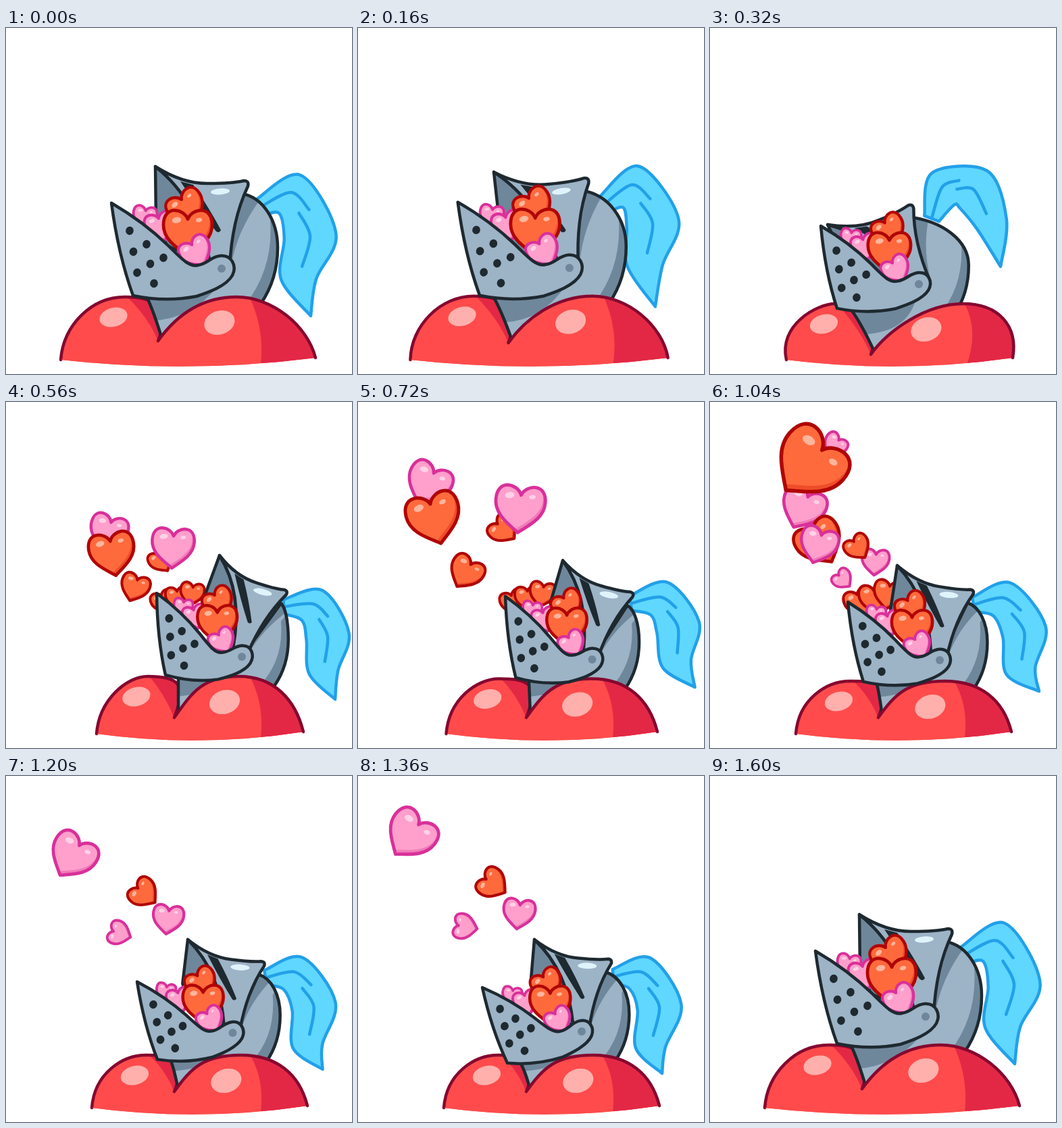
Recreate the animation shown at these times as an HTML page with a canvas. Size 512 by 512 pixels, loop 1.68 s.

```html
<!DOCTYPE html>
<html lang="en">
<head>
<meta charset="utf-8">
<title>Knight with hearts</title>
<style>
html, body { margin: 0; width: 100%; height: 100%; overflow: hidden; background: #fff; }
canvas { display: block; width: 100vw; height: 100vh; }
</style>
</head>
<body>
<canvas id="stage" width="512" height="512"></canvas>
<script>
const ctx = document.getElementById('stage').getContext('2d');
const LOOP = 1680, STEP = 80;
const INK = '#1e2930', STEEL = '#9db3c6', SHADE = '#6f879b';
const RED = { fill: '#ff6a3c', shade: '#ee4d2a', line: '#b00505', shine: '#ffb59c' };
const PINK = { fill: '#ff9fcc', shade: '#f07cb8', line: '#d9309a', shine: '#ffd2e8' };

// body: left, right, top, cleft x, cleft y, squash; jaw: tip, bottom, hinge;
// visor: tip, corner; plume: points of its middle line
const broad = [127, 446, 413, 249, 467, 0];
const rest = {
  body: [81, 458, 398, 225, 463, 0],
  jaw: [156, 259, 188, 395, 319, 356], visor: [221, 205, 358, 228],
  plume: [375, 266, 420, 246, 450, 308, 433, 372, 451, 426]
};
const shut = {
  body: [113, 448, 408, 238, 483, 1],
  jaw: [164, 293, 188, 414, 309, 379], visor: [174, 291, 299, 262],
  plume: [328, 282, 345, 238, 390, 239, 417, 290, 430, 353]
};
const burst = {
  body: [134, 440, 406, 249, 467, 0],
  jaw: [223, 283, 236, 403, 349, 377], visor: [316, 227, 416, 281],
  plume: [411, 303, 453, 301, 476, 347, 470, 400, 487, 440]
};
const spray = {
  body: broad,
  jaw: [213, 292, 231, 411, 344, 385], visor: [290, 242, 399, 287],
  plume: [396, 293, 438, 281, 471, 320, 474, 375, 510, 404]
};
const lean = {
  body: broad,
  jaw: [204, 296, 227, 413, 340, 382], visor: [277, 242, 390, 280],
  plume: [390, 300, 432, 292, 465, 340, 460, 398, 487, 428]
};
const settle = {
  body: broad,
  jaw: [184, 313, 221, 424, 331, 378], visor: [261, 242, 375, 273],
  plume: [378, 297, 417, 292, 446, 342, 433, 402, 450, 440]
};

const mix = (a, b, k) => a + (b - a) * k;
const mixPose = (a, b, k) => Object.fromEntries(
  Object.keys(a).map(part => [part, a[part].map((v, i) => mix(v, b[part][i], k))]));
const ease = k => k * k * (3 - 2 * k);
const easeOut = k => 1 - (1 - k) ** 2;

const timeline = [
  [0, rest], [100, mixPose(rest, lean, -.25)], [320, shut], [560, burst],
  [880, spray], [1040, lean], [1360, settle], [1600, rest], [LOOP, rest]
];

// Hearts of one volley land together: colour, x, y, width, angle
const MOUTH = { x: 265, y: 312 };
const volleys = [
  { launch: 400, gap: 0, land: 880, hearts: [
    [PINK, 88, 98, 74, 30], [RED, 98, 155, 88, -17], [RED, 211, 173, 50, -55],
    [PINK, 237, 139, 82, 6], [RED, 149, 245, 58, 36]] },
  { launch: 820, gap: 0, land: 1040, hearts: [
    [PINK, 184, 64, 40, 40], [PINK, 137, 157, 70, 25],
    [RED, 163, 208, 74, -31], [RED, 146, 93, 110, 42]] },
  { launch: 780, gap: 50, land: 1360, hearts: [
    [PINK, 238, 204, 52, 8], [RED, 200, 160, 50, -55],
    [PINK, 159, 223, 42, -80], [PINK, 77, 88, 78, 38]] }
];

// Hearts lying in the open jaw, in the rest pose
const load = [
  [PINK, 205, 280, 40, 10], [PINK, 229, 294, 50, -15], [RED, 268, 267, 60, -32],
  [RED, 269, 303, 77, 0], [PINK, 282, 332, 52, -32]
];

const heartPath = new Path2D('M0-.28C-.08-.5-.5-.58-.5-.16C-.5.15-.2.32 0 .48' +
  'C.2.32 .5.15 .5-.16C.5-.58 .08-.5 0-.28Z');
const jawPath = new Path2D('M156 259Q204 287 240 322C262 344 272 354 284 351' +
  'C299 349 303 338 318 337C334 336 342 352 335 366C326 382 300 391 282 397' +
  'Q236 406 188 396Q166 335 156 259Z');
const visorBack = new Path2D('M221 205L222 285L238 322L303 352Q285 255 221 205Z');
const visorFront = new Path2D('M221 205Q262 231 300 230Q335 230 352 226Q360 226 358 234' +
  'Q334 285 331 354L303 352Q285 255 221 205Z');
const slit = new Path2D('M258 227L277 232Q300 265 318 299Q316 304 311 301Q285 268 258 227Z');
const visorShadow = new Path2D('M358 230L376 254Q342 300 333 352L325 350Z');

const frameOf = ([x, y, ax, ay, bx, by]) => new DOMMatrix([ax - x, ay - y, bx - x, by - y, x, y]);
const affine = (from, to) => frameOf(to).multiply(frameOf(from).inverse());
const jawPlace = pose => affine(rest.jaw, pose.jaw);
const visorAnchors = ({ visor, jaw }) => [...visor, jaw[4] + 12, jaw[5] - 14];
const visorPlace = pose => affine(visorAnchors(rest), visorAnchors(pose));
const jawLength = ({ jaw }) => Math.hypot(jaw[4] - jaw[0], jaw[5] - jaw[1]);
const headScale = pose => jawLength(pose) / jawLength(rest);

function moved(path, matrix) {
  const result = new Path2D();
  result.addPath(path, matrix);
  return result;
}

function paint(path, fill, line, width = 4.5) {
  if (fill) { ctx.fillStyle = fill; ctx.fill(path); }
  if (line) { ctx.strokeStyle = line; ctx.lineWidth = width; ctx.stroke(path); }
}

function inside(path, draw) {
  ctx.save();
  ctx.clip(path);
  draw();
  ctx.restore();
}

function oval(x, y, rx, ry, angle, fill) {
  const path = new Path2D();
  path.ellipse(x, y, rx, ry, angle, 0, Math.PI * 2);
  paint(path, fill);
}

// Smooth run through points, as SVG path segments
function spline(points) {
  const at = i => points[Math.max(0, Math.min(points.length - 1, i))];
  let d = '';
  for (let i = 0; i < points.length - 1; i++) {
    const [p, q, r, s] = [at(i - 1), at(i), at(i + 1), at(i + 2)];
    d += `C${q.x + (r.x - p.x) / 6} ${q.y + (r.y - p.y) / 6} ` +
      `${r.x - (s.x - q.x) / 6} ${r.y - (s.y - q.y) / 6} ${r.x} ${r.y}`;
  }
  return d;
}
const startAt = points => `M${points[0].x} ${points[0].y}`;

function heart(tone, x, y, w, angle) {
  const size = w - 5;
  if (size < 4) return;
  const place = new DOMMatrix().translate(x, y).rotate(angle).scale(size);
  const path = moved(heartPath, place);
  paint(path, tone.shade);
  inside(path, () => {
    paint(moved(heartPath, place.translate(-.05, -.07)), tone.fill);
    for (const side of [-1, 1]) {
      const p = place.transformPoint({ x: side * .23, y: -.26 });
      const r = size * (.08 - side * .015);
      oval(p.x, p.y, r, r * .65, angle * Math.PI / 180 - .2, tone.shine);
    }
  });
  paint(path, null, tone.line, Math.min(5.5, 3 + size / 40));
}

// A ribbon around its middle line, swelling in the middle and pointed at the tip
function drawPlume(pose) {
  const line = '#22a0e9', scale = headScale(pose);
  const spine = [0, 2, 4, 6, 8].map(i => ({ x: pose.plume[i], y: pose.plume[i + 1] }));
  const beside = (i, amount) => {
    const before = spine[Math.max(0, i - 1)], after = spine[Math.min(4, i + 1)];
    const dx = after.x - before.x, dy = after.y - before.y, u = i / 4;
    const half = scale * amount * (13 * (1 - u) + 32 * Math.sin(Math.PI * u)) / Math.hypot(dx, dy);
    return { x: spine[i].x + dy * half, y: spine[i].y - dx * half };
  };
  const between = (a, b, k = .5) => ({ x: mix(a.x, b.x, k), y: mix(a.y, b.y, k) });
  const outer = spine.map((_, i) => beside(i, 1));
  const inner = spine.map((_, i) => beside(i, -1)).reverse();
  paint(new Path2D(startAt(outer) + spline(outer) + spline(inner) + 'Z'), '#5fd7ff', line);
  const strands = [
    [spine[0], beside(1, .1), between(beside(1, .5), beside(2, .5))],
    [between(spine[1], spine[2], .45), spine[2], between(spine[2], spine[3], .7)]
  ];
  for (const strand of strands) paint(new Path2D(startAt(strand) + spline(strand)), null, line);
}

function drawLobe([left, right, top, cx, cy, squash], isRight) {
  const bulge = 4 - 16 * squash;
  const lx = mix(left, cx, .66 - .08 * squash), rx = mix(cx, right, .5 + .15 * squash);
  const edge = isRight
    ? `M${cx} ${cy}C${cx + 25} ${cy - 35} ${rx - 55} ${top} ${rx} ${top}` +
      `C${rx + 52} ${top} ${right - 7 - bulge * 1.25} 440 ${right} 488`
    : `M${left} 491C${left + bulge} 440 ${left + 45} ${top} ${lx} ${top}` +
      `C${lx + 45} ${top} ${cx + 20} ${cy - 50} ${cx} ${cy}`;
  const shape = new Path2D(edge + (isRight ? '' : `L${right} 488`) +
    `Q${(left + right) / 2} 512 ${left} 491Z`);
  const sx = 358 + 16 * squash;
  const shadow = isRight
    ? `M${sx} ${top - 5}Q${sx + 28} 450 375 510H${right + 20}V${top - 5}Z`
    : `M${lx - 2} ${top - 5}Q${cx - 16} ${cy - 38} ${cx} ${cy}L${cx + 40} ${top - 5}Z`;
  paint(shape, '#ff4b4b');
  inside(shape, () => paint(new Path2D(shadow), '#e32845'));
  if (isRight) oval(mix(cx, right, .39), top + 38, 23, 17.5, -.3, '#ffb0ac');
  else oval(lx - 17, top + 30, 21, 14, -.25, '#ffb0ac');
  paint(new Path2D(edge), null, '#85082f');
}

function drawDome(pose) {
  const { body, jaw, visor } = pose, scale = headScale(pose);
  const [, , jx, jy, hx, hy] = jaw;
  const tx = visor[2] - 9, ty = visor[3] + 17;
  const rx = hx + 83 * scale, ry = hy - 31 * scale;
  const bx = hx + 58 * scale, by = hy + 52 * scale;
  const ax = jx + 19, ay = jy, nx = body[3] + 6, ny = body[4] - 8;
  const shape = new Path2D(
    `M${tx} ${ty}C${mix(tx, rx, .6)} ${ty + 6} ${rx} ${(ty + ry) / 2} ${rx} ${ry}` +
    `Q${rx} ${(ry + by) / 2 + 5} ${bx} ${by}L${nx} ${ny + 6}` +
    `Q${(ax + nx) / 2} ${(ay + ny) / 2 - 5} ${ax} ${ay}L${hx} ${hy}Z`);
  paint(shape, STEEL);
  inside(shape, () => {
    paint(new Path2D(`M${rx - 11} ${(ty + ry) / 2}Q${rx - 6} ${ry + 30} ${bx - 22} ${by}` +
      `H${rx + 10}V${ty}Z`), SHADE);
    paint(new Path2D(`M${ax - 6} ${ay - 6}L${hx - 5} ${hy + 25}` +
      `Q${nx + 45} ${ny - 25} ${nx - 14} ${ny - 22}Z`), SHADE);
    paint(moved(visorShadow, visorPlace(pose)), SHADE);
  });
  paint(shape, null, INK);
}

function drawVisor(pose) {
  const place = visorPlace(pose);
  paint(moved(visorBack, place), SHADE, INK);
  const front = moved(visorFront, place);
  paint(front, STEEL);
  inside(front, () => paint(moved(slit, place), INK));
  const shine = place.transformPoint({ x: 317, y: 242 });
  oval(shine.x, shine.y, 14, 4.5, Math.atan2(place.b, place.a) - .08, '#dff3fb');
  paint(front, null, INK);
}

function drawLoad(pose) {
  const place = jawPlace(pose), scale = headScale(pose);
  for (const [tone, x, y, w, angle] of load) {
    const p = place.transformPoint({ x, y });
    heart(tone, p.x, p.y, w * scale, angle);
  }
}

function drawJaw(pose) {
  const place = jawPlace(pose);
  paint(moved(jawPath, place), STEEL, INK);
  const hole = (x, y) => {
    const p = place.transformPoint({ x, y });
    oval(p.x, p.y, 5.8, 6.2, .3, INK);
  };
  // Three slanting rows of holes: 3, 2 and 2
  for (let row = 0; row < 3; row++)
    for (let i = 0; i < (row ? 2 : 3); i++)
      hole(183 + row * 5.5 + i * 25, 300 + row * 31 + i * (20 - row * 2));
  oval(pose.jaw[4], pose.jaw[5], 6, 6, 0, SHADE);
}

function drawVolley({ launch, gap, land, hearts }, t) {
  const FADE = 160;
  hearts.forEach(([tone, x, y, w, angle], i) => {
    const from = launch + gap * i;
    if (t <= from || t >= land + FADE) return;
    const k = easeOut(Math.min(1, (t - from) / (land - from)));
    const late = Math.max(0, t - land) / FADE;
    heart(tone, mix(mix(MOUTH.x, x, .2), x, k), mix(MOUTH.y, y, k) - late * 15,
      w * mix(.6, 1, k) * (1 - late ** 2), angle * k);
  });
}

// Hearts welling up behind the rim of the jaw
function drawFroth({ jaw }, t) {
  const k = (t - 440) / 720;
  if (k <= 0 || k >= 1) return;
  for (let i = 0; i < 3; i++)
    heart(RED, jaw[0] + 8 + i * 21 + k * 12, jaw[1] + 16 - i * 6 - k * 18, 38 + k * 14, i * 15 - 20);
}

function poseAt(t) {
  const i = timeline.findIndex(key => key[0] > t);
  const [t0, from] = timeline[i - 1], [t1, to] = timeline[i];
  return mixPose(from, to, ease((t - t0) / (t1 - t0)));
}

function draw(t) {
  const pose = poseAt(t);
  ctx.fillStyle = '#fff';
  ctx.fillRect(0, 0, 512, 512);
  ctx.lineCap = ctx.lineJoin = 'round';
  drawPlume(pose);
  drawLobe(pose.body, false);
  drawDome(pose);
  drawLobe(pose.body, true);
  drawFroth(pose, t);
  volleys.forEach(volley => drawVolley(volley, t));
  drawVisor(pose);
  drawLoad(pose);
  drawJaw(pose);
}

const start = performance.now();
function tick() {
  const t = (performance.now() - start) % LOOP;
  draw(Math.floor(t / STEP) * STEP);
  requestAnimationFrame(tick);
}
tick();
</script>
</body>
</html>
```
